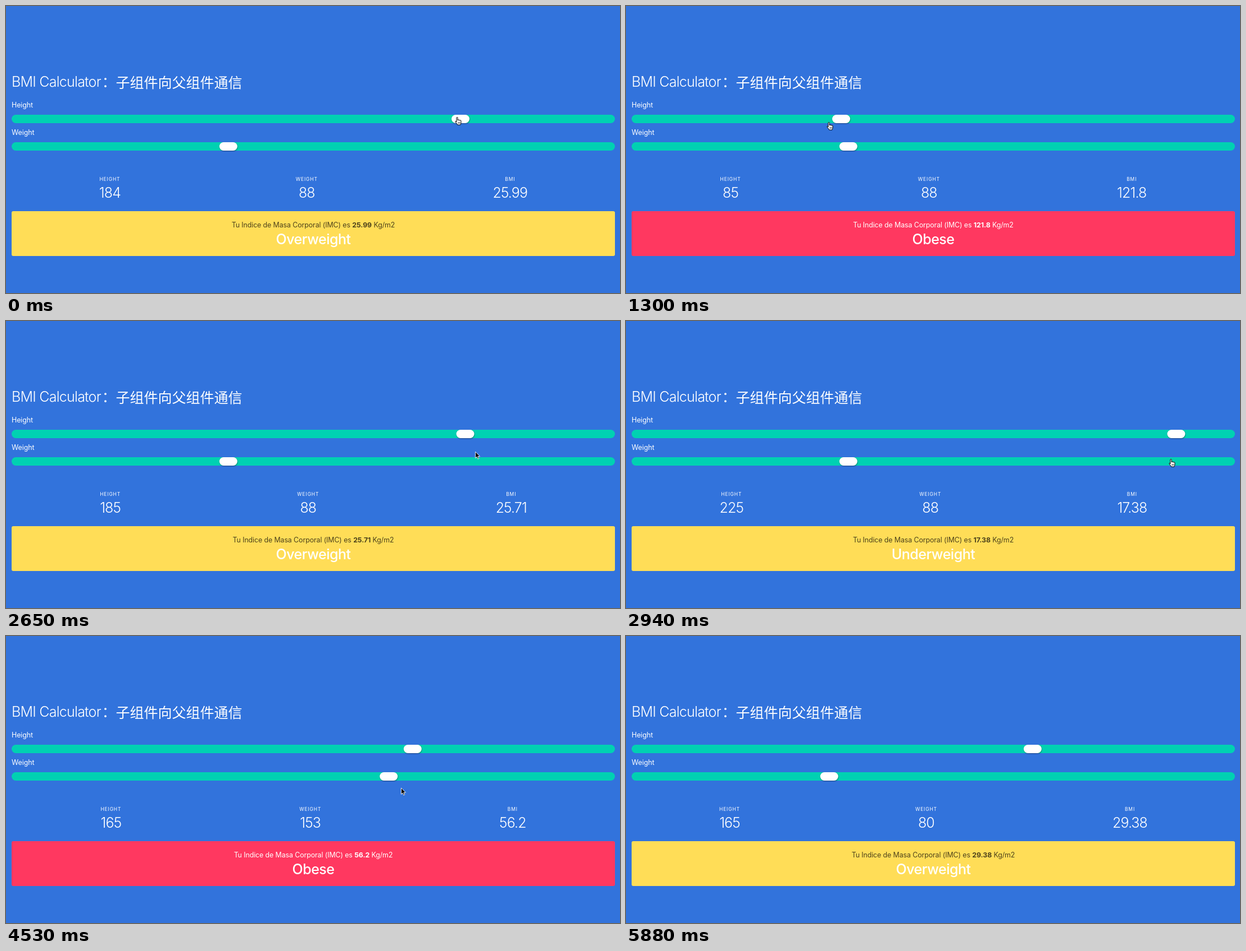
An HTML page for the animation above (6.56 s loop, 1093 by 512 pixels).

```html
<!DOCTYPE html>
<html lang="zh-Hans">
<head>
<meta charset="utf-8">
<title>BMI Calculator</title>
<style>
html, body { margin: 0; width: 100%; height: 100%; overflow: hidden; background: #3273dc; }
body { position: relative; color: #fff; font: 12.4px/16px Inter, "Noto Sans CJK SC", sans-serif; }
body > * { position: absolute; white-space: nowrap; }
.title { font-size: 25px; line-height: 30px; font-weight: 300; top: 120px; left: 10px; letter-spacing: -.75px; }
.cjk { font-family: "Noto Sans CJK SC", sans-serif; letter-spacing: 0; }
.label { left: 10px; letter-spacing: -.05px; }
.track { left: 10px; width: 1074px; height: 15px; border-radius: 7.5px; background: #00d1b2; }
.thumb { left: 0; width: 31.5px; height: 15px; border-radius: 7.5px; background: #fff; box-shadow: .5px 1px 2px rgba(0,0,0,.4); }
.level { left: 10px; top: 304px; width: 1074px; display: flex; }
.level div { flex: 1 1 auto; display: flex; flex-direction: column; align-items: center; }
.level small { font-size: 8.5px; line-height: 10px; letter-spacing: .85px; }
.level b { font-size: 25px; line-height: 30px; font-weight: 300; margin-top: 4px; letter-spacing: -.9px; }
.panel { left: 10px; top: 365.5px; width: 1074px; height: 80px; border-radius: 3px; text-align: center; }
.panel p { margin: 17px 0 0; letter-spacing: -.1px; }
.panel strong { font-weight: 700; }
.panel h2 { margin: 2px 0 0; color: #fff; font-size: 25px; line-height: 30px; font-weight: 500; letter-spacing: -.5px; }
svg { left: 0; top: 0; overflow: visible; }
</style>
</head>
<body>
<div class="title">BMI Calculator</div>
<div class="title cjk" style="left:164.5px;font-family:'Noto Sans CJK TC',sans-serif" lang="zh-Hant">：</div>
<div class="title cjk" style="left:195.5px">子组件向父组件通信</div>
<div class="label" style="top:169px">Height</div>
<div class="track" style="top:194px"></div>
<div class="thumb" id="hThumb" style="top:194px"></div>
<div class="label" style="top:218px">Weight</div>
<div class="track" style="top:243px"></div>
<div class="thumb" id="wThumb" style="top:243px"></div>
<div class="level">
  <div><small>HEIGHT</small><b id="height"></b></div>
  <div><small>WEIGHT</small><b id="weight"></b></div>
  <div><small>BMI</small><b id="bmi"></b></div>
</div>
<div class="panel" id="panel">
  <p>Tu Indice de Masa Corporal (IMC) es <strong id="imc"></strong> Kg/m2</p>
  <h2 id="status"></h2>
</div>
<svg id="cursor" width="12" height="15">
  <path id="arrow" d="M0 0V11.3L2.6 8.9L4.3 12.9L6.2 12.1L4.5 8.2H8Z" fill="#000" stroke="#fff" stroke-width=".9"/>
  <g id="hand" transform="translate(-4)" fill="#fff" stroke="#000" stroke-width="1" stroke-linejoin="round">
    <path d="M3 9V1.6a1.1 1.1 0 0 1 2.2 0V6a1 1 0 0 1 2 .1a1 1 0 0 1 2 .4a.9 .9 0 0 1 1.8 .6V10c0 2-1 2.6-1 4H4.6C4.4 12.4 2 10.6 1 8.6C.5 7.4 1.8 7 2.4 7.9Z"/>
    <path d="M5.9 9V12M7.5 9V12M9.1 9V12" stroke-width=".6"/>
  </g>
</svg>
<script>
const LOOP = 6560;
const steps = [0, 80, 290, 440, 620, 760, 880, 1000, 1180, 1300, 1420, 1530, 1680, 1830, 1950,
  2090, 2240, 2390, 2530, 2650, 2800, 2940, 3090, 3270, 3410, 3560, 3660, 3760, 3860, 3960, 4050,
  4150, 4260, 4380, 4530, 4650, 4760, 4910, 5030, 5240, 5330, 5420, 5510, 5610, 5700, 5790, 5880];

// [time, value...] points, linear between
const heightKeys = [[0, 185], [80, 180], [290, 166], [620, 130], [1000, 100], [1300, 85], [1530, 60],
  [1680, 36], [1830, 25], [1950, 29], [2090, 62], [2240, 111.1], [2390, 150], [2530, 178],
  [2650, 187], [2800, 207], [2940, 225], [3090, 205], [3270, 169], [3410, 166], [3560, 165]];
const weightKeys = [[3760, 88], [3960, 92], [4150, 104], [4380, 126], [4530, 155], [4650, 165],
  [4760, 148], [4910, 96], [5030, 80]];
const cursorKeys = [[0, 803, 198], [290, 715, 199], [1000, 432, 200], [1300, 361, 207], [1530, 225, 184],
  [1680, 138, 184], [1830, 113, 184], [1950, 124, 190], [2090, 300, 204], [2240, 585, 219],
  [2530, 780, 228], [2940, 970, 246], [3270, 705, 240], [3560, 507, 235], [3760, 396, 246],
  [3960, 415, 249], [4380, 592, 262], [4530, 703.5, 271], [4650, 730, 272], [4760, 640, 268],
  [5030, 362, 252], [5240, 385, 262], [5790, 770, 453]];
// how far the shown numbers trail the thumbs
const hLagKeys = [[0, 1], [80, 0], [2090, 0], [2240, 3], [2530, 3], [2650, 2], [2940, 0]];
const wLagKeys = [[4260, 0], [4530, 2], [4650, 0]];

function at(keys, t) {
  const i = keys.findIndex(k => k[0] > t);
  if (i === 0) return keys[0].slice(1);
  if (i < 0) return keys[keys.length - 1].slice(1);
  const a = keys[i - 1], b = keys[i], p = (t - a[0]) / (b[0] - a[0]);
  return a.slice(1).map((v, n) => v + (b[n + 1] - v) * p);
}

const $ = id => document.getElementById(id);
const text = (id, s) => { $(id).textContent = s; };
const slide = (id, v) => { $(id).style.transform = `translateX(${20.7 + 4.26 * v - 15.75}px)`; };
const onTrack = y => (y >= 194 && y <= 209) || (y >= 243 && y <= 258);

function verdict(bmi) {
  if (bmi < 18.5) return ["Underweight", "#ffdd57"];
  if (bmi < 25) return ["Normal", "#23d160"];
  if (bmi < 30) return ["Overweight", "#ffdd57"];
  return ["Obese", "#ff3860"];
}

function draw(t) {
  const [h] = at(heightKeys, t), [w] = at(weightKeys, t);
  const height = Math.round(h - at(hLagKeys, t)[0]);
  const weight = Math.round(w - at(wLagKeys, t)[0]);
  const bmi = +(weight / (height / 100) ** 2).toFixed(2);
  const [name, color] = verdict(bmi);
  slide("hThumb", h);
  slide("wThumb", w);
  text("height", height);
  text("weight", weight);
  text("bmi", bmi);
  text("imc", bmi);
  text("status", name);
  $("panel").style.background = color;
  $("panel").style.color = color === "#ffdd57" ? "rgba(0,0,0,.7)" : "#fff";

  const [x, y] = at(cursorKeys, t), hand = onTrack(y);
  $("cursor").style.transform = `translate(${x}px,${y}px)`;
  $("cursor").style.display = t >= 5880 ? "none" : "block";
  $("hand").style.display = hand ? "inline" : "none";
  $("arrow").style.display = hand ? "none" : "inline";
}

const start = performance.now();
let shown = -1;
function tick() {
  const t = (performance.now() - start) % LOOP;
  const step = steps.filter(s => s <= t).pop();
  if (step !== shown) draw(shown = step);
  requestAnimationFrame(tick);
}
tick();
</script>
</body>
</html>
```
